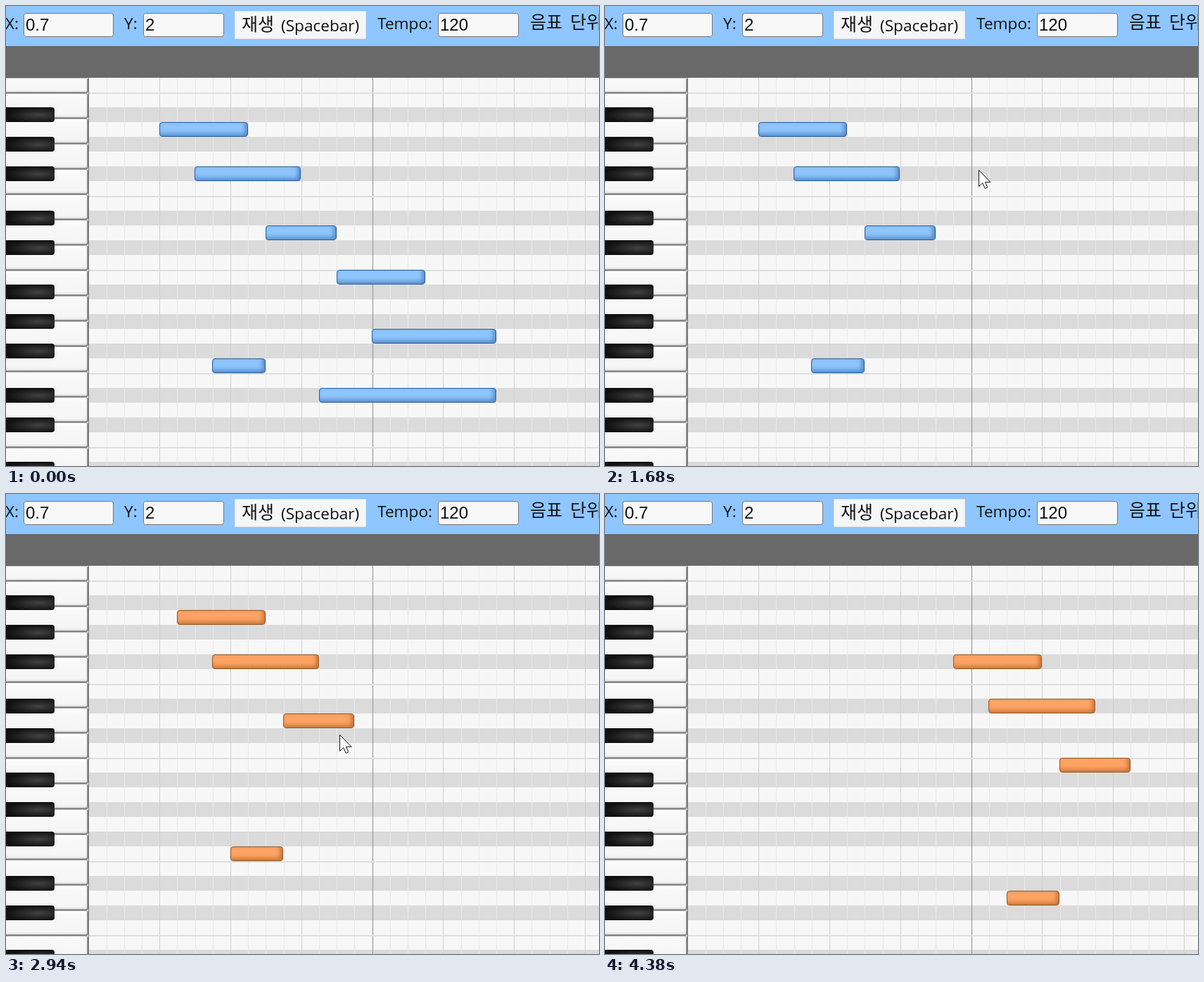
An HTML page that plays this animation: 843 by 654 pixels, repeating every 4.8 s.

```html
<!DOCTYPE html>
<html lang="ko">
<head>
<meta charset="utf-8">
<title>Piano roll</title>
<style>
html, body { margin: 0; width: 100%; height: 100%; overflow: hidden; background: #f7f7f7; }
#stage { position: absolute; left: 0; top: 0; width: 843px; height: 654px; overflow: hidden; }
#stage div, #stage svg { position: absolute; box-sizing: border-box; }
#roll { left: 0; top: 102px; width: 843px; height: 552px; overflow: hidden; }
#bar { left: 0; top: 0; width: 843px; height: 57px; background: #8fc6ff; }
#ruler { left: 0; top: 57px; width: 843px; height: 45px; background: #696969; }
.white {
  left: -8px; width: 125px; height: 36px; border: 1px solid #777; border-top-color: #aaa;
  border-radius: 3px; background: linear-gradient(#fff, #f8f8f8 20%, #f6f6f6 85%, #e4e4e4);
  box-shadow: inset -1px -1px 1px #999;
}
.black {
  left: -8px; width: 77px; height: 21px; border-radius: 4px;
  background: radial-gradient(ellipse 46px 11px at 54px 11px, #424242, #2a2a2a 45%, #101010);
}
.note {
  height: 21px; border: 1px solid #2a609c; border-radius: 4px; background: #8fc6ff;
  box-shadow: inset -3px -3px 6px rgba(20, 70, 130, .5);
}
.note.on { border-color: #8f5a26; background: #ffa464; box-shadow: inset -3px -3px 6px rgba(130, 65, 10, .5); }
#sel { border: 1px solid #2e6cab; background: rgba(143, 198, 255, .5); }
text { font-size: 22.6px; fill: #111; }
.ui { font-family: "Open Sans", "Noto Sans", sans-serif; }
.ko { font-family: "Noto Sans CJK KR", "Noto Sans CJK", sans-serif; font-size: 25px; }
.num { font-family: "Liberation Sans", Arial, sans-serif; font-size: 24px; }
</style>
</head>
<body>
<div id="stage">
  <svg id="grid" width="843" height="654"></svg>
  <div id="roll"></div>
  <div id="bar"></div>
  <div id="ruler"></div>
  <svg width="843" height="57">
    <g fill="#f8f8f8" stroke="#767676">
      <rect x="25.5" y="10.5" width="127" height="33" rx="3"/>
      <rect x="195.5" y="10.5" width="114" height="33" rx="3"/>
      <rect x="614.5" y="10.5" width="114" height="33" rx="3"/>
      <rect x="325.5" y="7.5" width="186" height="39" fill="#f6f6f6" stroke="#e2e2e2"/>
    </g>
    <g class="ui">
      <text x="-1" y="33">X:</text>
      <text x="168" y="33">Y:</text>
      <text x="391" y="36">(Spacebar)</text>
      <text x="528" y="33">Tempo:</text>
    </g>
    <g>
      <text class="ko" x="335" y="35">재생</text>
      <text class="ko" x="745" y="32">음표</text>
      <text class="ko" x="802" y="32">단위</text>
      <text class="num" x="28" y="35">0.7</text>
      <text class="num" x="198" y="35">2</text>
      <text class="num" x="617" y="35">120</text>
    </g>
  </svg>
  <div id="notes"></div>
  <div id="sel"></div>
  <svg id="cursor" width="20" height="30">
    <path d="M.5 .5V23.5L5.8 18.6L9.2 26.4L12.8 24.9L9.5 17.4H17Z" fill="#fff" stroke="#111"/>
  </svg>
</div>
<script>
const LOOP = 4800, STEP = 60, LAG = 24;
const X0 = 117, COL = 25.2, TOP = 144, ROW = 21, ROWS = 25;
const $ = id => document.getElementById(id);
const colX = c => Math.round(X0 + c * COL);
const isBlack = r => [0, 2, 4, 7, 9].includes(r % 12);

function add(parent, cls, top = 0) {
  const el = document.createElement('div');
  el.className = cls;
  el.style.top = top + 'px';
  parent.append(el);
  return el;
}

function buildGrid() {
  let s = '';
  const rect = (x, y, w, h, fill) => {
    s += `<rect x="${x}" y="${y}" width="${w}" height="${h}" fill="${fill}"/>`;
  };
  rect(0, 102, 843, 552, '#f7f7f7');
  for (let r = 0; r < ROWS; r++)
    if (isBlack(r)) rect(X0, TOP + r * ROW, 726, ROW, '#dbdbdb');
  for (let c = 1; c < 29; c++) {
    const color = c % 16 === 0 ? '#8e8e8e' : c % 4 === 0 ? '#d0d0d0' : '#e9e9e9';
    rect(Math.round(X0 + c * COL + .4), 102, 1, 552, color);
  }
  for (let r = -1; r < ROWS; r++)
    if ([6, 11].includes((r + 12) % 12)) rect(X0, TOP + r * ROW, 726, 2, '#dfdfdf');
  rect(X0, 102, 1, 552, '#7c7c7c');
  $('grid').innerHTML = s;
}

function buildKeys() {
  const roll = $('roll');
  add(roll, 'white').style.height = '22px';
  for (let y = 22; y < 552; y += 36) add(roll, 'white', y);
  for (let r = 0; r < ROWS; r++)
    if (isBlack(r)) add(roll, 'black', TOP - 102 + r * ROW);
}

// column, row, length in columns
const notes = [
  [4, 1, 5], [6, 4, 6], [10, 8, 4], [7, 17, 3],
  [14, 11, 5], [16, 15, 7], [13, 19, 10]
].map(([c, r, len], i) => ({ c, r, len, erased: i > 3, el: add($('notes'), 'note') }));

// pointer stops and turns: time, x, y
const path = [
  [60, 269, 176], [300, 747, 323], [600, 584, 583], [720, 567, 586],
  [1260, 567, 586], [1320, 576, 586], [1440, 576, 586], [1680, 531, 233],
  [1800, 524, 152], [2040, 316, 440], [2100, 282, 517], [2160, 268, 545],
  [2280, 261, 559], [2580, 432, 325], [2700, 432, 325], [3240, 582, 382],
  [3480, 688, 410], [3600, 711, 396], [4260, 711, 396], [4320, 784, 300]
];
const drags = [{ from: 300, to: 960 }, { from: 1800, to: 2280 }];
const move = { from: 2580, to: 3600 };
const ERASE = 1320, HIDE = 4380;

const slope = (i, a) => (path[i + 1][a] - path[i][a]) / (path[i + 1][0] - path[i][0]);

// zero at turns and stops, otherwise the harmonic mean of both sides
function tangent(i, a) {
  if (i === 0) return slope(0, a);
  if (i === path.length - 1) return slope(i - 1, a);
  const p = slope(i - 1, a), q = slope(i, a);
  return p * q > 0 ? 2 * p * q / (p + q) : 0;
}

function pos(t) {
  t = Math.max(path[0][0], Math.min(t, path[path.length - 1][0]));
  const i = Math.max(1, path.findIndex(p => t <= p[0])) - 1;
  const p = path[i], q = path[i + 1], d = q[0] - p[0], u = (t - p[0]) / d;
  return [1, 2].map(a => Math.round(
    p[a] + (q[a] - p[a]) * u * u * (3 - 2 * u) +
    d * u * (1 - u) * (tangent(i, a) * (1 - u) - tangent(i + 1, a) * u)
  ));
}

// the box trails the pointer slightly and stays fixed once released
function boxAt(d, t) {
  const [r, top] = pos(d.from);
  const [x, y] = pos(Math.max(d.from, Math.min(t, d.to) - LAG));
  return { l: x - 1, t: top, r, b: y + 1 };
}

function place(el, x, y, w, h) {
  el.style.left = x + 'px';
  el.style.top = y + 'px';
  if (w !== undefined) el.style.width = w + 'px';
  if (h !== undefined) el.style.height = h + 'px';
}

const show = (el, on) => { el.style.display = on ? 'block' : 'none'; };

function draw(time) {
  const t = Math.floor(time / STEP) * STEP;
  const drag = drags.filter(d => t > d.from).pop();
  const box = drag && boxAt(drag, t);

  const [gx, gy] = pos(move.from);
  const [mx, my] = pos(Math.max(move.from, Math.min(t, move.to)));
  const dc = Math.floor((mx - gx) / COL), dr = Math.floor((my - gy) / ROW);

  for (const n of notes) {
    const l = colX(n.c), r = colX(n.c + n.len), y = TOP + n.r * ROW;
    const hit = box && l < box.r && r > box.l && y < box.b && y + ROW > box.t;
    n.el.classList.toggle('on', !!hit);
    show(n.el, !n.erased || t < ERASE);
    const x = colX(n.c + dc);
    place(n.el, x, y + dr * ROW, colX(n.c + dc + n.len) - x);
  }

  const open = drag && t < drag.to;
  show($('sel'), open);
  if (open) place($('sel'), box.l, box.t, box.r - box.l, box.b - box.t);

  show($('cursor'), t >= path[0][0] && t < HIDE);
  place($('cursor'), ...pos(t));
}

buildGrid();
buildKeys();
const start = performance.now();
function tick() {
  draw((performance.now() - start) % LOOP);
  requestAnimationFrame(tick);
}
tick();
</script>
</body>
</html>
```
